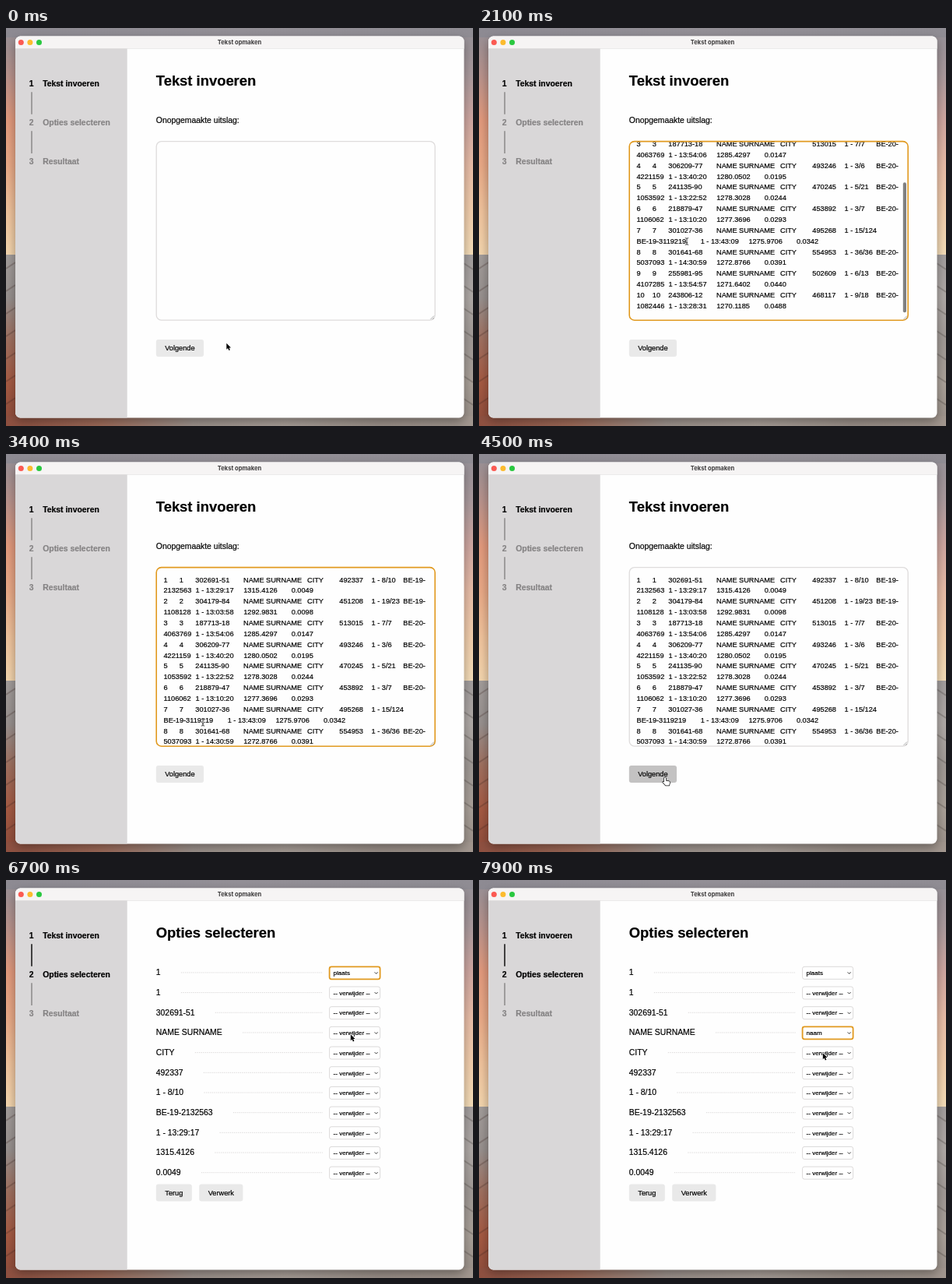
An HTML page with a canvas for the animation above (8000 ms loop, 600x511 px).

```html
<!DOCTYPE html>
<html lang="nl">
<head>
<meta charset="utf-8">
<title>Tekst opmaken</title>
<style>
html, body { margin: 0; width: 100%; height: 100%; overflow: hidden; background: #8f8b93; }
canvas { display: block; width: 600px; height: 511px; }
</style>
</head>
<body>
<canvas id="stage"></canvas>
<script>
const W = 600, H = 511, LOOP = 8000, STEP = 100;
const SANS = '"Liberation Sans", Arial, sans-serif';
const UI = 'Inter, sans-serif';
const ORANGE = '#e19a20';
const canvas = document.getElementById('stage');
const ctx = canvas.getContext('2d');
const dpr = window.devicePixelRatio || 1;
canvas.width = W * dpr;
canvas.height = H * dpr;

// number, ring, rank, ring end, clock, speed
const records = [
  '302691-51|492337|1 - 8/10|BE-19-2132563|13:29:17|1315.4126',
  '304179-84|451208|1 - 19/23|BE-19-1108128|13:03:58|1292.9831',
  '187713-18|513015|1 - 7/7|BE-20-4063769|13:54:06|1285.4297',
  '306209-77|493246|1 - 3/6|BE-20-4221159|13:40:20|1280.0502',
  '241135-90|470245|1 - 5/21|BE-20-1053592|13:22:52|1278.3028',
  '218879-47|453892|1 - 3/7|BE-20-1106062|13:10:20|1277.3696',
  '301027-36|495268|1 - 15/124|BE-19-3119219|13:43:09|1275.9706',
  '301641-68|554953|1 - 36/36|BE-20-5037093|14:30:59|1272.8766',
  '255981-95|502609|1 - 6/13|BE-20-4107285|13:54:57|1271.6402',
  '243806-12|468117|1 - 9/18|BE-20-1082446|13:28:31|1270.1185'
].map(r => r.split('|'));

const fields = ['1', '1', '302691-51', 'NAME SURNAME', 'CITY', '492337', '1 - 8/10',
  'BE-19-2132563', '1 - 13:29:17', '1315.4126', '0.0049'];
const choices = ['-- verwijder --', 'plaats', 'naam', 'gemeente', 'snelheid'];
const rowY = i => 118.9 + i * 25.68;

// time, x, y of the pointer
const path = [
  [0, 283, 404.5], [300, 283, 404.5], [1000, 267, 274], [2900, 267, 274],
  [3900, 239, 415.5], [4600, 239, 415.5], [5200, 441, 119], [5400, 441, 119],
  [5700, 440.5, 133], [6000, 440.5, 133], [6600, 442.5, 198], [7000, 442.5, 198],
  [7500, 441.5, 222], [8000, 441.5, 222]
];

const ease = p => p * p * (3 - 2 * p);

function pointer(t) {
  let i = 0;
  while (i < path.length - 2 && t >= path[i + 1][0]) i++;
  const [t0, x0, y0] = path[i], [t1, x1, y1] = path[i + 1];
  const p = ease((t - t0) / (t1 - t0));
  return [x0 + (x1 - x0) * p, y0 + (y1 - y0) * p];
}

// a hairline outline gives the type a slightly fuller weight
function text(s, x, y, size, color = '#000', weight = 400, family = SANS, align = 'left') {
  ctx.font = `${weight} ${size}px ${family}`;
  ctx.fillStyle = ctx.strokeStyle = color;
  ctx.textAlign = align;
  ctx.lineWidth = 0.2;
  ctx.fillText(s, x, y);
  if (family === SANS) ctx.strokeText(s, x, y);
}

function box(x, y, w, h, r, fill, stroke, lw = 1) {
  ctx.beginPath();
  ctx.roundRect(x, y, w, h, r);
  if (fill) { ctx.fillStyle = fill; ctx.fill(); }
  if (stroke) { ctx.strokeStyle = stroke; ctx.lineWidth = lw; ctx.stroke(); }
}

function line(color, lw, ...pts) {
  ctx.beginPath();
  for (let i = 0; i < pts.length; i += 2) ctx.lineTo(pts[i], pts[i + 1]);
  ctx.strokeStyle = color;
  ctx.lineWidth = lw;
  ctx.stroke();
}

function gradient(x, y, w, h, colors, across) {
  const g = across ? ctx.createLinearGradient(x, 0, x + w, 0) : ctx.createLinearGradient(0, y, 0, y + h);
  colors.forEach((c, i) => g.addColorStop(i / (colors.length - 1), c));
  ctx.fillStyle = g;
  ctx.fillRect(x, y, w, h);
}

function wallpaper() {
  gradient(0, 0, 300, 295, ['#938f96', '#b8938d', '#e39a7d', '#eaaa87', '#f1c49d', '#f5d8b0']);
  gradient(300, 0, 300, 295, ['#938f96', '#ab9b9e', '#d1a8a2', '#eabea8', '#f3cfad', '#f6dfba']);
  gradient(0, 0, W, 12, ['#8e8b93', '#949097', '#908d94'], true);
  gradient(0, 291, 300, 220, ['#a39d9b', '#98918f', '#a0705f', '#a65a43', '#8d4c3b']);
  gradient(300, 291, 300, 220, ['#a39e9e', '#b0aaa7', '#a19a96', '#aaa199', '#9a9089']);
  gradient(0, 498, W, 13, ['#8f5040', '#a06c5a', '#a0958f', '#aba19a', '#9d928b', '#a2978f'], true);
  // soft cracks in the rock
  for (let i = 0; i < 7; i++) {
    const y = 306 + i * 29;
    line('rgba(60,35,30,.25)', 2, 0, y + 3, 12, y - 5);
    line('rgba(60,50,48,.25)', 2, 588, y - 4, 600, y + 4);
  }
}

function frame() {
  ctx.save();
  ctx.shadowColor = 'rgba(0,0,0,.36)';
  ctx.shadowBlur = 14 * dpr;
  ctx.shadowOffsetY = 5 * dpr;
  box(12, 10.5, 576.5, 490, 6.5, '#fefefe');
  ctx.restore();
  ctx.save();
  ctx.beginPath();
  ctx.roundRect(12, 10.5, 576.5, 490, 6.5);
  ctx.clip();
  ctx.fillStyle = '#d9d7d8';
  ctx.fillRect(12, 26, 143.7, 475);
  ctx.fillStyle = '#f6f4f4';
  ctx.fillRect(12, 10, 577, 16.2);
  ctx.fillStyle = '#e2e0e0';
  ctx.fillRect(12, 26, 577, 0.6);
  ctx.restore();
  ['#fb5a53', '#fcbb2e', '#2ac840'].forEach((c, i) => {
    ctx.beginPath();
    ctx.arc(19.3 + i * 11.6, 18.4, 3.5, 0, 7);
    ctx.fillStyle = c;
    ctx.fill();
  });
  text('Tekst opmaken', 300, 21.1, 7.6, '#3c3a3b', 700, UI, 'center');
}

function sidebar(step) {
  ['Tekst invoeren', 'Opties selecteren', 'Resultaat'].forEach((s, i) => {
    const y = 74.8 + i * 50.1, c = i <= step ? '#000' : '#858384';
    text(i + 1, 29.8, y, 10.4, c, 700);
    text(s, 47.2, y, 10.4, c, 700);
    if (i < 2) line(i < step ? '#000' : '#858384', 1.4, 33, y + 7.4, 33, y + 36);
  });
}

function button(label, x, y, w, fill = '#e9e9e9') {
  box(x, y, w, 22, 3, fill);
  text(label, x + w / 2, y + 14.3, 9.2, '#000', 400, SANS, 'center');
}

function results(scroll) {
  ctx.save();
  ctx.beginPath();
  ctx.rect(194, 146.2, 356, 228.2);
  ctx.clip();
  const put = (s, x, y) => text(s, x, y, 9.2);
  records.forEach(([num, ring, rank, id, clock, speed], i) => {
    const y = 164.5 + i * 27.73 - scroll, y2 = y + 13.87;
    const long = rank.length > 9, cut = long ? 0 : 6, shift = long ? 41.2 : 0;
    put(i + 1, 202.5, y);
    put(i + 1, 222.8, y);
    put(num, 243.3, y);
    put('NAME SURNAME', 305, y);
    put('CITY', 387, y);
    put(ring, 428.3, y);
    put(rank, 469.5, y);
    if (cut) put(id.slice(0, cut), 510.3, y);
    put(id.slice(cut), 202.5, y2);
    put('1 - ' + clock, 243.5 + shift, y2);
    put(speed, 305.2 + shift, y2);
    put(((i + 1) * 0.004885).toFixed(4), 366.7 + shift, y2);
  });
  ctx.restore();
}

function inputPage(t) {
  text('Tekst invoeren', 192.8, 74.4, 18.4, '#000', 700);
  text('Onopgemaakte uitslag:', 192.8, 122.2, 10.4);
  const focus = t >= 1100 && t < 4400;
  if (t >= 2000) {
    const p = Math.min(1, Math.max(0, (t - 2200) / 566));
    const scroll = 68 * (1 - ease(p));
    results(scroll);
    if (t < 3300) box(544.8, 148 + scroll * 0.74, 4.2, 167, 2.1, '#808080');
  }
  box(193.2, 145.6, 358, 229.6, 6.5, null, focus ? ORANGE : '#dedcdc', focus ? 1.6 : 1.3);
  line('#8a8a8a', 0.7, 545.5, 374, 550, 369.5);
  line('#8a8a8a', 0.7, 548, 374, 550, 372);
  const [x, y] = pointer(t);
  button('Volgende', 192.8, 400, 61.2, overButton(x, y) ? '#c3c2c2' : '#e9e9e9');
}

const overButton = (x, y) => x > 193 && x < 254 && y > 400 && y < 422;

function select(i, value, focus) {
  const y = rowY(i) + 0.4;
  box(415.6, y - 8, 65, 16, 2.5, '#fff', focus ? ORANGE : '#d2d0d0', focus ? 1.8 : 0.8);
  text(value, 420.6, y + 2.8, 8);
  line('#222', 0.9, 473.6, y - 0.9, 475.6, y + 1.1, 477.6, y - 0.9);
}

function menu(i, y) {
  const cy = rowY(i) + 0.6, top = cy - 10.3;
  ctx.save();
  ctx.shadowColor = 'rgba(0,0,0,.32)';
  ctx.shadowBlur = 9 * dpr;
  ctx.shadowOffsetY = 3 * dpr;
  box(410.6, top, 77.6, 73, 4, '#ebe9ea');
  ctx.restore();
  box(410.6, top, 77.6, 73, 4, null, '#c9c7c8', 0.6);
  const hot = Math.round((y - cy) / 13.3);
  choices.forEach((s, k) => {
    const ky = cy + k * 13.25;
    if (k === hot) box(413.6, ky - 6.6, 71.4, 13.2, 2.5, '#418ffb');
    const c = k === hot ? '#fff' : '#1c1c1c';
    text(s, 424.6, ky + 2.9, 7.9, c, 400, UI);
    if (!k) line(c, 1.1, 416.3, ky + 0.3, 418.2, ky + 2.5, 421.5, ky - 2.8);
  });
}

function optionsPage(t) {
  text('Opties selecteren', 192.8, 74.4, 18.4, '#000', 700);
  const first = t >= 6000, second = t >= 7800;
  fields.forEach((s, i) => {
    const y = rowY(i);
    text(s, 192.8, y + 3.3, 10.4);
    const end = 192.8 + ctx.measureText(s).width;
    ctx.setLineDash([1.4, 1.2]);
    line('#d3d1d1', 0.8, end + 26.3, y, 407, y);
    ctx.setLineDash([]);
    const value = i === 0 && first ? 1 : i === 3 && second ? 2 : 0;
    const focus = i === 0 ? first && t < 7000 : i === 3 && t >= 7000;
    select(i, choices[value], focus);
  });
  button('Terug', 192.8, 390.4, 46);
  button('Verwerk', 248.2, 390.4, 56.2);
  const y = pointer(t)[1];
  if (t >= 5400 && t < 6000) menu(0, y);
  if (t >= 7100 && t < 7800) menu(3, y);
}

function outlined(d, x, y, fill, stroke, lw) {
  const p = new Path2D(d);
  ctx.save();
  ctx.translate(x, y);
  ctx.lineJoin = 'round';
  ctx.strokeStyle = stroke;
  ctx.lineWidth = lw;
  ctx.stroke(p);
  ctx.fillStyle = fill;
  ctx.fill(p);
  ctx.restore();
}

function cursor(t) {
  const [x, y] = pointer(t);
  const input = t < 4600;
  if (input && overButton(x, y)) {
    outlined('M-1 1Q-1-.2 0-.2Q1-.2 1 1V4L5.2 4.8Q6.5 5.2 6.2 6.5L5.2 10H.8L-2.8 6Q-3 4.8-1 5.6Z', x, y, '#fff', '#111', 1.4);
  } else if (input && x > 193 && x < 551 && y > 146 && y < 375) {
    for (const [c, w] of [['#fff', 2], ['#333', 0.9]]) {
      line(c, w, x, y - 4, x, y + 4);
      line(c, w, x - 2.2, y - 4.4, x, y - 3.8, x + 2.2, y - 4.4);
      line(c, w, x - 2.2, y + 4.4, x, y + 3.8, x + 2.2, y + 4.4);
      line(c, w, x - 1.2, y + 1.6, x + 1.2, y + 1.6);
    }
  } else {
    outlined('M.3.3V8.2L2.1 6.6L3.4 9.5L4.9 8.8L3.6 6L6 5.9Z', x, y, '#000', '#fff', 1.2);
  }
}

function draw(t) {
  ctx.setTransform(dpr, 0, 0, dpr, 0, 0);
  wallpaper();
  frame();
  const step = t < 4600 ? 0 : 1;
  sidebar(step);
  if (step) optionsPage(t); else inputPage(t);
  cursor(t);
}

const start = performance.now();
function tick(now) {
  const t = Math.max(0, now - start) % LOOP;
  draw(Math.floor(t / STEP) * STEP);
  requestAnimationFrame(tick);
}
draw(0);
requestAnimationFrame(tick);
</script>
</body>
</html>
```
